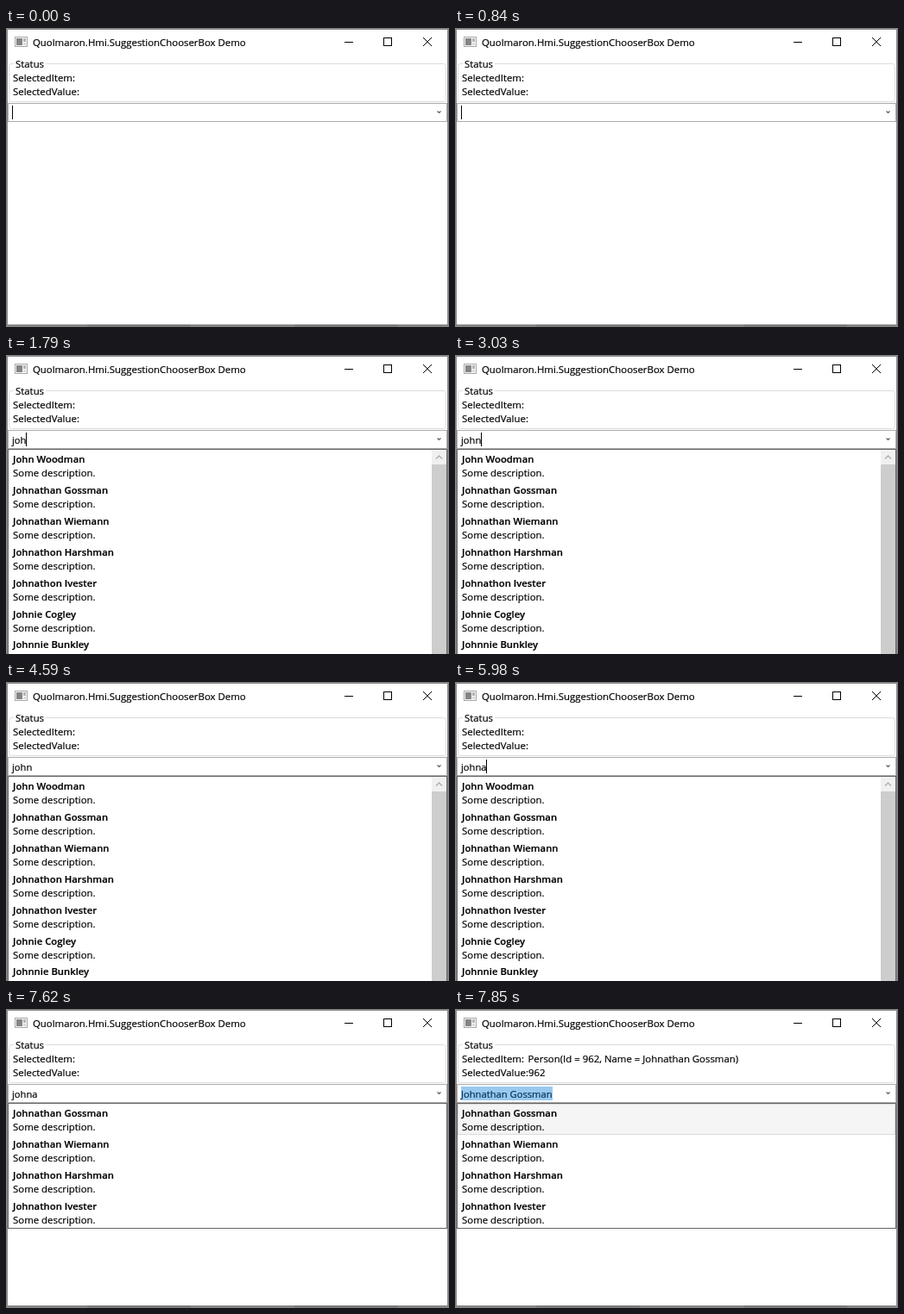
An HTML page for the animation above (8000 ms loop, 513 px wide and 347 px high).

```html
<!DOCTYPE html>
<html lang="en">
<head>
<meta charset="utf-8">
<title>Combo box demo</title>
<style>
  html, body { margin: 0; width: 100%; height: 100%; overflow: hidden; background: #868686; }
  svg { display: block; width: 513px; height: 347px; }
  text { font: 11.4px "Open Sans", "Noto Sans", sans-serif; fill: #000; stroke: #000; stroke-width: .2; white-space: pre; }
  .name { font-size: 11.3px; font-weight: 600; }
  #input { font-size: 11.2px; }
  .line { fill: none; stroke: #000; }
  .crisp { shape-rendering: crispEdges; }
</style>
</head>
<body>
<svg viewBox="0 0 513 347">
  <rect width="513" height="347" fill="#868686"/>
  <g class="crisp" fill="#7b7b7b">
    <rect x="94" y="344" width="120" height="3"/>
    <rect x="334" y="344" width="120" height="3"/>
  </g>
  <rect class="crisp" x="2" y="2" width="509" height="342" fill="#fff"/>

  <g class="crisp">
    <rect x="10.5" y="10.5" width="14" height="11" fill="#f6f6f6" stroke="#a8a8a8"/>
    <rect x="12" y="12" width="7" height="8" fill="#858585"/>
    <rect x="20" y="12" width="3" height="4" fill="#b4b4b4"/>
    <rect x="20" y="17" width="3" height="3" fill="#dcdcdc"/>
  </g>
  <text x="31" y="21">Quolmaron.Hmi.SuggestionChooserBox Demo</text>
  <path class="line crisp" d="M392 16.5h10M437.5 11.5h9v9h-9z"/>
  <path class="line" d="M483 11l10 10M493 11l-10 10"/>

  <rect x="3.5" y="41.5" width="506" height="44" rx="3" fill="none" stroke="#dcdcdc"/>
  <rect x="9" y="39" width="37" height="6" fill="#fff"/>
  <text x="11" y="46">Status</text>
  <text x="8" y="62">SelectedItem:</text>
  <text x="8" y="78">SelectedValue:</text>
  <g id="status">
    <text x="84.5" y="62">Person(Id = 962, Name = Johnathan Gossman)</text>
    <text x="85" y="78">962</text>
  </g>

  <rect class="crisp" x="2.5" y="87.5" width="508" height="21" fill="#fff" stroke="#acacac"/>
  <path class="line" d="M499.5 96.5l2 2 2-2" style="stroke:#606060;stroke-width:1.2"/>
  <text id="input" x="7" y="103"></text>
  <rect id="selection" class="crisp" x="7" y="90" height="16" fill="#0078d7" opacity=".4"/>
  <rect id="caret" class="crisp" y="90" width="1" height="16"/>

  <g id="popup">
    <rect id="frame" class="crisp" x="2.5" y="109.5" width="508" fill="#fff" stroke="#646464"/>
    <rect id="hover" class="crisp" x="3.5" y="110.5" width="506" height="35" fill="#f5f5f5" stroke="#dadada"/>
    <g id="items"></g>
    <g id="scrollbar">
      <rect class="crisp" x="493" y="110" width="17" height="17" fill="#f0f0f0"/>
      <rect class="crisp" x="493" y="127" width="17" height="220" fill="#cdcdcd"/>
      <path class="line" d="M498 120.5l3.5-3.5 3.5 3.5" style="stroke:#a9b0b8;stroke-width:1.4"/>
    </g>
  </g>
</svg>
<script>
  const LOOP = 8000, ROW = 35.91, INPUT_X = 7;
  const people = [
    "John Woodman", "Johnathan Gossman", "Johnathan Wiemann", "Johnathon Harshman",
    "Johnathon Ivester", "Johnie Cogley", "Johnnie Bunkley"
  ];
  const typing = [[0, ""], [1030, "jo"], [1260, "joh"], [3030, "john"], [5980, "johna"], [7770, "Johnathan Gossman"]];
  // Spans in which the caret is lit.
  const lit = [[0, 230], [840, 1260], [1330, 2340], [2800, 3580], [4130, 4590], [5200, 5750], [5980, 6610], [7160, 7620]];

  const $ = id => document.getElementById(id);
  const show = (id, on) => $(id).style.display = on ? "" : "none";
  const set = (id, name, value) => $(id).setAttribute(name, value);

  function drawItems(names) {
    $("items").innerHTML = names.map((name, i) => {
      const y = 125 + Math.round(i * ROW);
      return `<text class="name" x="8" y="${y}">${name}</text><text x="8" y="${y + 16}">Some description.</text>`;
    }).join("");
  }

  let lastList = "";
  function render(t) {
    const typed = typing.filter(([at]) => at <= t).pop()[1];
    const input = $("input");
    if (input.textContent !== typed) input.textContent = typed;
    const width = typed ? input.getComputedTextLength() : 0;

    show("caret", lit.some(([from, to]) => t >= from && t < to));
    set("caret", "x", Math.floor(INPUT_X + width));

    const picked = t >= 7770;
    show("selection", picked);
    set("selection", "width", Math.ceil(width));
    show("status", picked);
    show("hover", t >= 7850);

    const filtered = t >= 6440;
    show("popup", t >= 1790);
    show("scrollbar", !filtered);
    set("frame", "height", filtered ? 145 : 260);
    const list = filtered ? people.slice(1, 5) : people;
    if (list.join() !== lastList) drawItems(list);
    lastList = list.join();
  }

  const start = performance.now();
  function tick() {
    render((performance.now() - start) % LOOP);
    requestAnimationFrame(tick);
  }
  tick();
</script>
</body>
</html>
```
